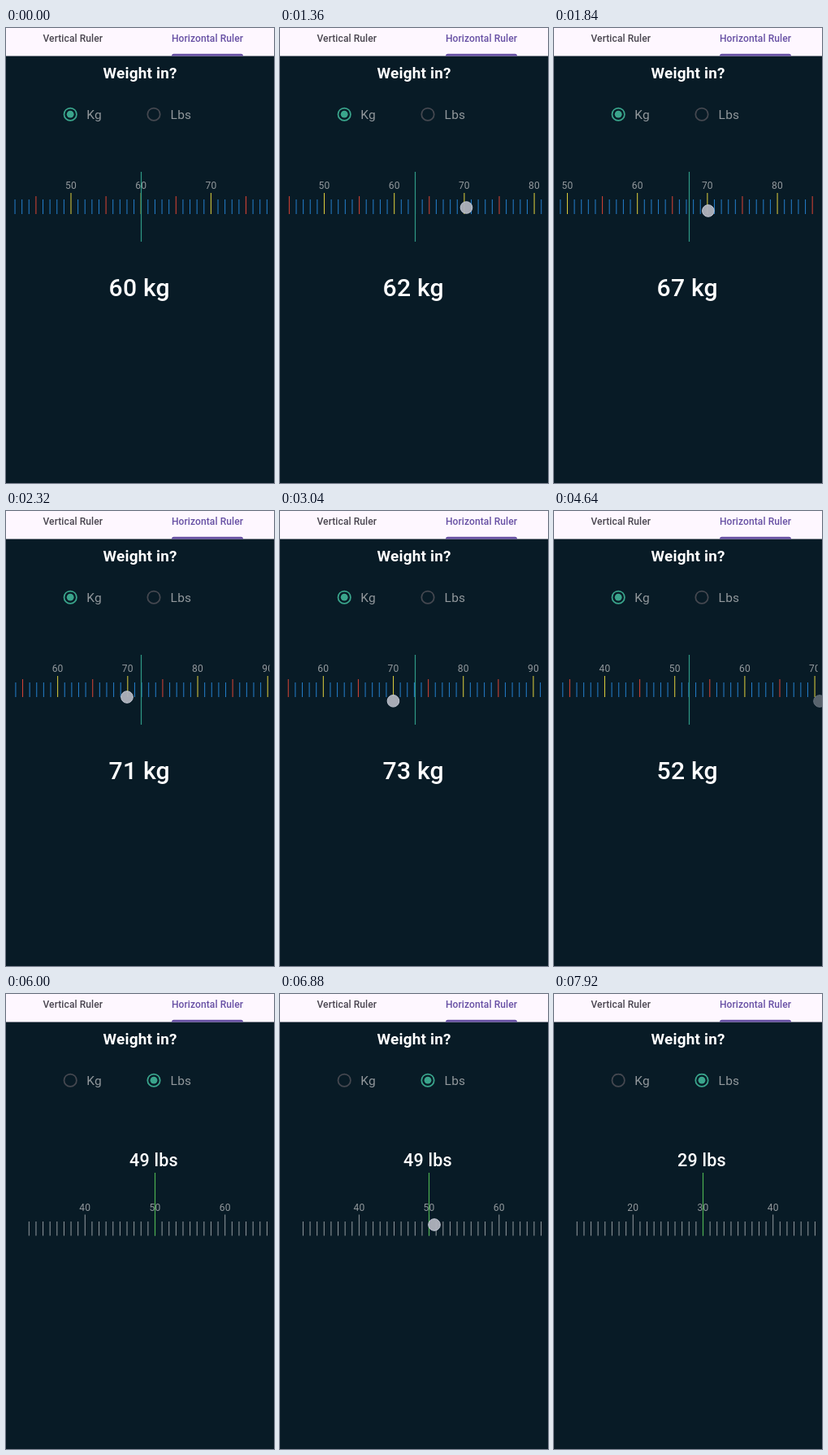
These frames come from a looping animation (330 by 560 pixels, 8000 ms). An HTML page:

```html
<!DOCTYPE html>
<html lang="en">
<head>
<meta charset="utf-8">
<title>Ruler picker</title>
<style>
  html, body { margin: 0; width: 100%; height: 100%; overflow: hidden; background: #081b26; }
  svg { display: block; width: 330px; height: 560px; font-family: Roboto, sans-serif; }
  .mid { text-anchor: middle; }
  .tab { font-size: 12.04px; font-weight: 500; letter-spacing: .086px; }
  .title { font-size: 18.92px; font-weight: 700; letter-spacing: .215px; fill: #fff; }
  .option { font-size: 15.5px; letter-spacing: .215px; fill: #92989c; }
  .label { font-size: 12.04px; letter-spacing: .215px; fill: #92989c; }
  .value { font-weight: 500; letter-spacing: .215px; fill: #fff; }
</style>
</head>
<body>
<svg viewBox="0 0 330 560">
  <defs>
    <clipPath id="kgClip"><rect x="6" y="170" width="318.6" height="100"/></clipPath>
    <clipPath id="lbsClip"><rect x="23.5" y="240" width="301.1" height="70"/></clipPath>
  </defs>
  <rect width="330" height="560" fill="#081b26"/>
  <rect width="330" height="34.5" fill="#fef7ff"/>
  <path d="M204 34.5v-.1a2.6 2.6 0 0 1 2.6-2.6h82.8a2.6 2.6 0 0 1 2.6 2.6v.1z" fill="#6750a4"/>
  <text class="tab mid" x="82.3" y="17" fill="#49454f">Vertical Ruler</text>
  <text class="tab mid" x="248" y="17" fill="#6750a4">Horizontal Ruler</text>
  <text class="title mid" x="165.2" y="61.5">Weight in?</text>

  <g id="radios"></g>
  <text class="option" x="99.3" y="111.6">Kg</text>
  <text class="option" x="202.6" y="111.6">Lbs</text>

  <g id="kg">
    <g clip-path="url(#kgClip)"><g id="kgScale"></g></g>
    <path d="M166.5 177V263" stroke="#2f9a86" stroke-width="1.2"/>
    <text id="kgValue" class="value mid" x="164.2" y="329.6" font-size="30.1"></text>
  </g>
  <g id="lbs">
    <g clip-path="url(#lbsClip)"><g id="lbsScale"></g></g>
    <path d="M183.5 220V297.5" stroke="#4caf50" stroke-width="1.2"/>
    <text id="lbsValue" class="value mid" x="182" y="212.4" font-size="21.5"></text>
  </g>
  <circle id="touch" r="7.3" fill="#b0b3bd" stroke="#ccd0dc" stroke-width="1"/>
</svg>
<script>
const LOOP = 8000, STEP = 80, GAP = 8.62, SWITCH = 5200;
const $ = id => document.getElementById(id);

function add(parent, tag, attrs, text = '') {
  const el = document.createElementNS('http://www.w3.org/2000/svg', tag);
  for (const k in attrs) el.setAttribute(k, attrs[k]);
  el.textContent = text;
  return parent.appendChild(el);
}

function buildScale(scale, from, to, bottom, labelY, style) {
  for (let n = from; n <= to; n++) {
    const x = n * GAP, { h, color } = style(n);
    add(scale, 'path', { d: `M${x} ${bottom - h}V${bottom}`, stroke: color, 'stroke-width': 1.05 });
    if (n % 10 === 0) add(scale, 'text', { class: 'label mid', x, y: labelY }, n);
  }
}

buildScale($('kgScale'), 28, 100, 229, 198.4, n =>
  n % 10 === 0 ? { h: 26, color: '#d8ca3c' } :
  n % 5 === 0 ? { h: 22, color: '#d34234' } : { h: 18, color: '#237bc6' });
buildScale($('lbsScale'), 5, 75, 297.5, 267.4, n =>
  ({ h: n % 10 === 0 ? 26 : 17.5, color: '#8d959a' }));

const radios = [79.2, 182].map(cx => ({
  ring: add($('radios'), 'circle', { cx, cy: 106.2, r: 7.7, fill: 'none', 'stroke-width': 1.75 }),
  dot: add($('radios'), 'circle', { cx, cy: 106.2, fill: '#3aa58c' })
}));

// Monotone cubic curve through [time, value] points.
function curve(points) {
  const slope = i => (points[i + 1][1] - points[i][1]) / (points[i + 1][0] - points[i][0]);
  const tangent = points.map((_, i) => {
    if (i === 0 || i === points.length - 1) return 0;
    const a = slope(i - 1), b = slope(i);
    return a * b > 0 ? 2 * a * b / (a + b) : 0;
  });
  return t => {
    if (t <= points[0][0]) return points[0][1];
    const i = points.findIndex(p => p[0] >= t) - 1;
    if (i < 0) return points[points.length - 1][1];
    const [t0, v0] = points[i], [t1, v1] = points[i + 1];
    const d = t1 - t0, u = (t - t0) / d, w = 1 - u;
    return w * w * (1 + 2 * u) * v0 + u * u * (3 - 2 * u) * v1 +
      d * u * w * (w * tangent[i] - u * tangent[i + 1]);
  };
}

const kgAt = curve([[960, 60], [1360, 62.96], [2320, 71.9], [2720, 75.2], [3680, 63.4], [4400, 52.8], [4640, 52.03]]);
const lbsAt = curve([[6800, 50], [6880, 49.99], [7280, 40.5], [7520, 33.5], [7920, 30]]);

const touches = [
  { from: 960, to: 4720, fade: 160,
    x: curve([[960, 257], [1360, 229.5], [2320, 149], [2720, 118], [3680, 234], [4400, 322], [4640, 327]]),
    y: curve([[960, 219], [1360, 221], [2320, 229], [3680, 236], [4640, 234]]) },
  { from: 5040, to: 5440, fade: 120, x: () => 184, y: () => 107 },
  { from: 6440, to: 7680, fade: 160,
    x: curve([[6480, 176], [6880, 190], [7280, 272], [7520, 330], [7680, 340]]),
    y: () => 284 }
];

const clamp = v => Math.max(0, Math.min(1, v));

function draw(t) {
  const isKg = t < SWITCH, kg = kgAt(t), lbs = lbsAt(t);
  $('kg').style.display = isKg ? '' : 'none';
  $('lbs').style.display = isKg ? 'none' : '';
  $('kgScale').setAttribute('transform', `translate(${166.2 - kg * GAP} 0)`);
  $('lbsScale').setAttribute('transform', `translate(${183.5 - lbs * GAP} 0)`);
  $('kgValue').textContent = `${Math.floor(kg)} kg`;
  $('lbsValue').textContent = `${Math.floor(lbs - .02)} lbs`;

  const k = clamp((t - SWITCH + 80) / 200);
  radios.forEach(({ ring, dot }, i) => {
    ring.setAttribute('stroke', isKg === (i === 0) ? '#3aa58c' : '#454850');
    dot.setAttribute('r', 4.4 * (i ? k : 1 - k));
  });

  const touch = touches.find(p => t >= p.from && t < p.to);
  $('touch').style.opacity = touch
    ? .95 * clamp((t - touch.from) / touch.fade) * clamp((touch.to - t) / touch.fade) : 0;
  if (touch) {
    $('touch').setAttribute('cx', touch.x(t));
    $('touch').setAttribute('cy', touch.y(t));
  }
}

function tick() {
  const t = performance.now() % LOOP;
  draw(Math.floor(t / STEP) * STEP);
  requestAnimationFrame(tick);
}
tick();
</script>
</body>
</html>
```
